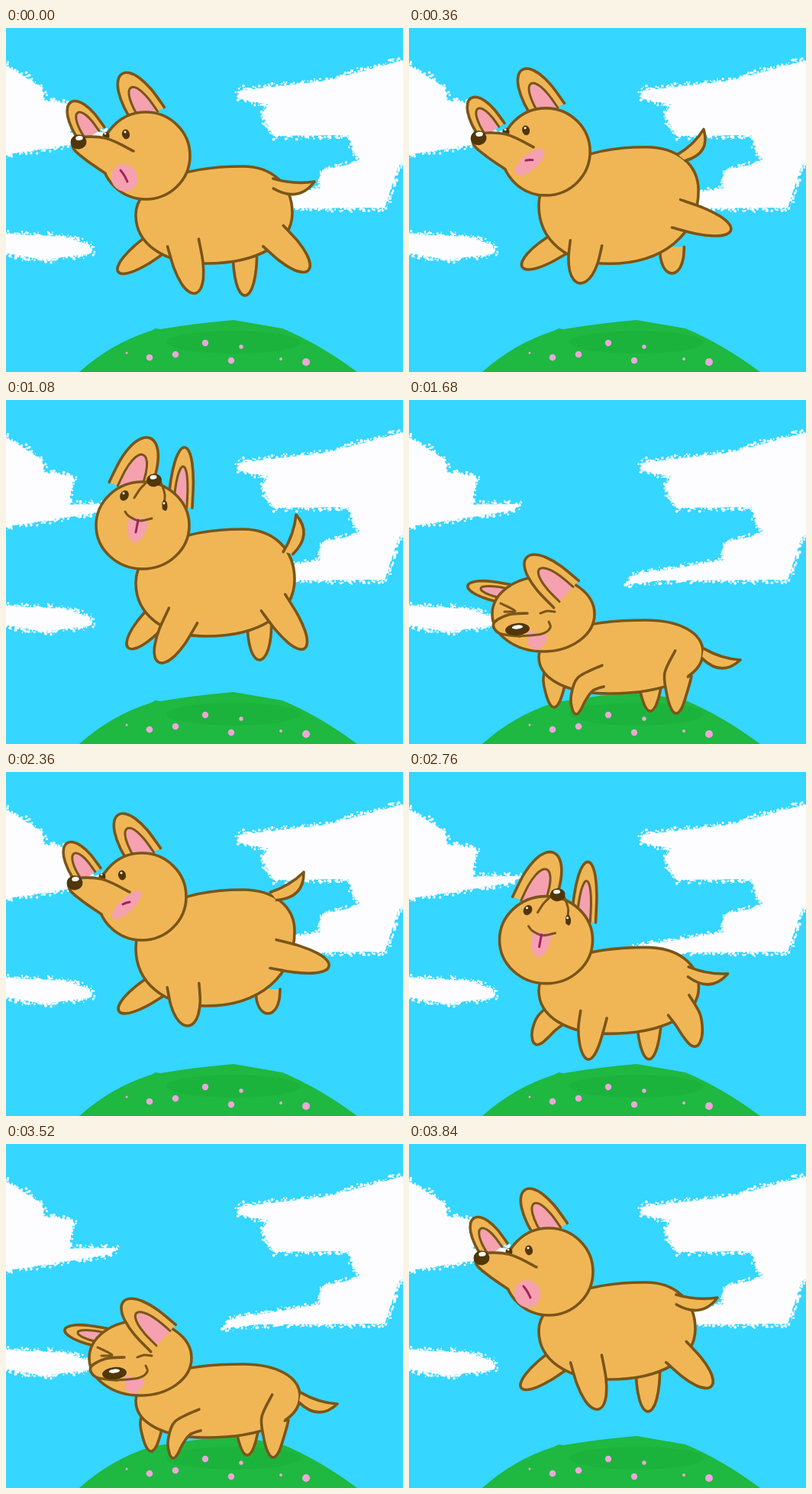
Write an HTML page with a canvas that moves like this. It is 520 by 450 pixels and loops after 3.88 s.

```html
<!DOCTYPE html>
<html lang="en">
<head>
<meta charset="utf-8">
<title>Jumping dog</title>
<style>
  html, body { margin: 0; overflow: hidden; background: #35d6ff; }
  canvas { display: block; }
</style>
</head>
<body>
<canvas id="stage" width="520" height="450"></canvas>
<script>
const W = 520, H = 450, LOOP = 3880, JUMP = LOOP / 4, STEP = 40;
const FUR = '#f0b656', LINE = '#7a5518', PINK = '#f5a1b0', DARK = '#503608';
const WHITE = '#fdfdff', MOUTH = '#a3215f';
const stage = document.getElementById('stage').getContext('2d');
const scenery = document.createElement('canvas');
scenery.width = W;
scenery.height = H;
let ctx = scenery.getContext('2d');

const mix = (a, b, u) => a.map((v, i) => v + (b[i] - v) * u);

// ---------- drawing helpers ----------
function paint(fill, width = 3.6, color = LINE) {
  if (fill) {
    ctx.fillStyle = fill;
    ctx.fill();
  }
  if (width) {
    ctx.lineWidth = width;
    ctx.strokeStyle = color;
    ctx.stroke();
  }
}

// Smooth open path through [x, y] points
function trace(points) {
  const at = i => points[Math.max(0, Math.min(points.length - 1, i))];
  const handle = (i, side) => at(i).map((v, k) => v + side * (at(i + 1)[k] - at(i - 1)[k]) / 6);
  ctx.beginPath();
  ctx.moveTo(...at(0));
  for (let i = 1; i < points.length; i++) {
    ctx.bezierCurveTo(...handle(i - 1, 1), ...handle(i, -1), ...at(i));
  }
}

function line(points, color = LINE) {
  trace(points);
  paint(null, 3, color);
}

function oval(x, y, rx, ry, fill, angle = 0, width = 0) {
  ctx.beginPath();
  ctx.ellipse(x, y, rx, ry, angle, 0, 2 * Math.PI);
  paint(fill, width);
}

// Rounded finger from root to tip; bend moves its knee straight above the tip
function limb(root, tip, halfWidth, bend = 0) {
  const knee = mix(mix(root, tip, 0.5), [tip[0], root[1]], bend * 0.9);
  const points = [];
  for (let k = -1; k <= 1; k += 0.25) {
    const s = 1 - k * k, side = halfWidth * Math.sin(k * Math.PI / 2);
    const a = mix(root, knee, s), b = mix(knee, tip, s);
    const [x, y] = mix(a, b, s), dx = b[0] - a[0], dy = b[1] - a[1], length = Math.hypot(dx, dy);
    points.push([x - dy / length * side, y + dx / length * side]);
  }
  trace(points);
}

// ---------- scenery ----------
let seed = 11;
const random = () => (seed = seed * 16807 % 2147483647) / 2147483647;
const jitter = size => (random() + random() - 1) * size;

function cloud(...points) {
  ctx.beginPath();
  for (const point of points) ctx.lineTo(...point);
  paint(WHITE, 0);
  points.forEach((from, i) => {
    const to = points[(i + 1) % points.length];
    const dots = Math.hypot(to[0] - from[0], to[1] - from[1]);
    for (let d = 0; d < dots; d++) {
      const [x, y] = mix(from, to, d / dots), r = 0.5 + random() * 1.5;
      oval(x + jitter(6), y + jitter(6), r, r, WHITE);
    }
  });
}

function drawScenery() {
  ctx.fillStyle = '#35d6ff';
  ctx.fillRect(0, 0, W, H);
  cloud([-9, 44], [12, 56], [47, 78], [50, 95], [88, 100], [82, 137], [143, 136], [138, 144], [-9, 167]);
  cloud([-9, 269], [75, 273], [110, 284], [111, 295], [50, 303], [-9, 293]);
  cloud([529, 40], [420, 69], [306, 82], [304, 92], [344, 100], [335, 112], [350, 141], [449, 140],
        [457, 164], [466, 175], [414, 186], [411, 210], [296, 229], [284, 241], [330, 236], [496, 235],
        [514, 180], [529, 170]);

  ctx.fillStyle = '#1fb840';
  ctx.fill(new Path2D('M96 450Q137 413 190 396L196 393 202 394Q250 386 298 382L362 393Q410 413 460 450Z'));
  oval(298, 411, 88, 15, 'rgba(20,165,50,.25)');
  for (const [x, y, r] of [[158, 425, 1.5], [188, 431, 4.3], [222, 427, 4.3], [261, 412, 4.2],
                           [308, 417, 2.7], [295, 435, 4.2], [360, 433, 2], [393, 437, 5]]) {
    oval(x, y, r, r, '#efa6dc');
  }
}

// ---------- jump ----------
// feet: far front, near front, far back, near back; tail: base, tip
const POSES = {
  rise: { head: [180, 168], top: [181], rump: [375, 242], belly: [308], bend: [0],
          feet: [147, 319, 248, 347, 313, 350, 396, 317], tail: [350, 203, 404, 201] },
  float: { head: [179, 163], top: [169], rump: [378, 235], belly: [309], bend: [0],
           feet: [160, 324, 200, 343, 332, 340, 391, 325], tail: [369, 200, 380, 150] },
  peak: { head: [179, 160], top: [160], rump: [382, 225], belly: [314], bend: [0],
          feet: [149, 312, 183, 338, 348, 333, 418, 291], tail: [373, 187, 376, 136] },
  fall: { head: [175, 164], top: [154], rump: [378, 208], belly: [306], bend: [0],
          feet: [148, 313, 239, 332, 343, 316, 423, 254], tail: [350, 162, 390, 131] },
  land: { head: [179, 280], top: [288], rump: [385, 330], belly: [384], bend: [1],
          feet: [190, 402, 219, 411, 316, 407, 350, 410], tail: [385, 331, 434, 340] }
};

// time, pose, easing power on the way to that pose
const KEYS = [
  [0, 'rise', 1], [110, 'float', 1], [210, 'peak', 1], [420, 'fall', 1],
  [585, 'land', 1.6], [765, 'land', 1], [895, 'rise', 0.7], [JUMP, 'rise', 1]
];

function poseAt(time) {
  const i = KEYS.findIndex(key => key[0] > time);
  const [t0, from] = KEYS[i - 1], [t1, to, power] = KEYS[i];
  const u = ((time - t0) / (t1 - t0)) ** power;
  const pose = {};
  for (const part in POSES[from]) pose[part] = mix(POSES[from][part], POSES[to][part], u);
  return pose;
}

function torso([top], rump, [belly]) {
  const anchors = [[170, (top + belly) / 2], [310, top], rump, [262, belly]];
  ctx.beginPath();
  ctx.moveTo(...anchors[0]);
  anchors.forEach((a, i) => {
    const b = anchors[(i + 1) % 4];
    const corner = i % 2 ? [b[0], a[1]] : [a[0], b[1]];
    ctx.bezierCurveTo(...mix(a, corner, 0.6), ...mix(b, corner, 0.6), ...b);
  });
  paint(FUR);
}

function tail([x, y, tipX, tipY]) {
  const dx = tipX - x, dy = tipY - y, length = Math.hypot(dx, dy);
  const beside = (s, side) => [x + dx * s - dy / length * side, y + dy * s + dx / length * side];
  ctx.beginPath();
  ctx.moveTo(...beside(0, -6));
  ctx.quadraticCurveTo(...beside(0.5, 3), tipX, tipY);
  ctx.quadraticCurveTo(...beside(0.6, 27), ...beside(0, 7));
  paint(FUR);
}

function drawBody({ top, rump, belly, bend: [bend], feet, tail: tailLine }) {
  const foot = i => feet.slice(2 * i, 2 * i + 2);
  const leg = (i, hip, halfWidth) => {
    limb(hip, foot(i), halfWidth, bend);
    paint(FUR);
  };
  leg(0, [200 - 8 * bend, belly[0] - 28], 16);
  leg(2, [foot(2)[0], belly[0] - 22], 16);
  torso(top, rump, belly);
  leg(1, [232 + 22 * bend, belly[0] - 27 + 4 * bend], 21 - 7 * bend);
  leg(3, [350 + 7 * bend, rump[1] + 30 - 15 * bend], 19);
  tail(tailLine);
}

// ---------- heads ----------
function ear(root, tip, halfWidth) {
  limb(root, tip, halfWidth);
  paint(FUR);
  limb(root, mix(root, tip, 0.68), halfWidth * 0.55);
  paint(PINK, 3);
}

function eye(x, y, rx, ry, angle = 0) {
  oval(x, y, rx, ry, DARK, angle);
  oval(x - 1, y - 3, 1.5, 1.5, WHITE);
}

function nose(x, y, rx, ry, shineX, shineY) {
  oval(x, y, rx, ry, DARK, -0.1);
  oval(x + shineX, y + shineY, rx * 0.45, ry * 0.32, WHITE, -0.1);
}

function tongue(root, tip) {
  limb(root, tip, 13);
  paint(PINK, 0);
}

function sideHead(turn) {
  ear([113, 140], [85, 97], 19);
  ear([188, 116], [152, 60], 23);
  oval(183, 167, 58, 57, FUR, 0, 3.6);
  eye(131, 141, 4.5, 5);
  trace([[130, 190], [104, 172], [88, 157], [93, 144], [130, 144], [167, 161]]);
  paint(FUR);
  nose(95, 149, 10.5, 9.5, 1, -5);
  eye(157, 139, 5, 6.5, -0.2);
  const [x, y, rx, ry, angle] = mix([155, 196, 17, 18, -0.5], [163, 178, 25, 9, -0.75], turn);
  oval(x, y, rx, ry, PINK, angle);
  const slant = 9 * (1 - turn);
  line([[x - 5, y - slant - 1], [x, y - 3], [x + 4, y + slant - 4]], MOUTH);
}

function frontHead() {
  ear([160, 118], [189, 50], 27);
  ear([228, 140], [234, 62], 16);
  oval(179, 164, 61, 57, FUR, 0, 3.6);
  line([[185, 107], [176, 116], [168, 128]]);
  line([[203, 108], [208, 124], [206, 142]]);
  eye(155, 125, 5.5, 7, 0.5);
  eye(208, 138, 3.5, 7, -0.1);
  nose(194, 105, 10, 8.5, -1, -4);
  tongue([174, 154], [168, 186]);
  line([[156, 146], [161, 152], [174, 158], [191, 155]]);
  line([[173, 157], [170, 173]], MOUTH);
}

function squintHead(smiling) {
  ear([130, 254], [77, 243], 13);
  oval(176, 280, 67, 49, FUR, 0, 3.6);
  ear([206, 254], [154, 206], 24);
  line([[120, 266], [139, 276], [125, 277]]);
  line([[172, 279], [181, 276], [191, 277]]);
  if (smiling) tongue([169, 305], [164, 326]);
  else oval(174, 301, 25, 13, PINK, -0.55);
  trace([[155, 279], [130, 281], [111, 292], [118, 305], [145, 309]]);
  paint(FUR);
  if (smiling) line([[183, 290], [185, 298], [174, 306], [145, 309]]);
  nose(142, 300, 16, 8, 0, -3);
}

function drawHead(phase, secondJump, [x, y]) {
  const grounded = phase >= 520 && phase < 805;
  const front = secondJump !== phase >= 805;
  const [homeX, homeY] = grounded ? [179, 280] : front ? [179, 163] : [180, 168];
  ctx.save();
  ctx.translate(x - homeX, y - homeY);
  if (grounded) squintHead(secondJump);
  else if (front) frontHead();
  else sideHead(phase < 805 ? Math.min(1, phase / 420) : 0);
  ctx.restore();
}

function render() {
  const time = Math.floor(performance.now() % LOOP / STEP) * STEP;
  const phase = time % JUMP;
  const pose = poseAt(phase);
  ctx.drawImage(scenery, 0, 0);
  drawBody(pose);
  drawHead(phase, Math.floor(time / JUMP) % 2 === 1, pose.head);
  requestAnimationFrame(render);
}

drawScenery();
ctx = stage;
ctx.lineCap = ctx.lineJoin = 'round';
render();
</script>
</body>
</html>
```
